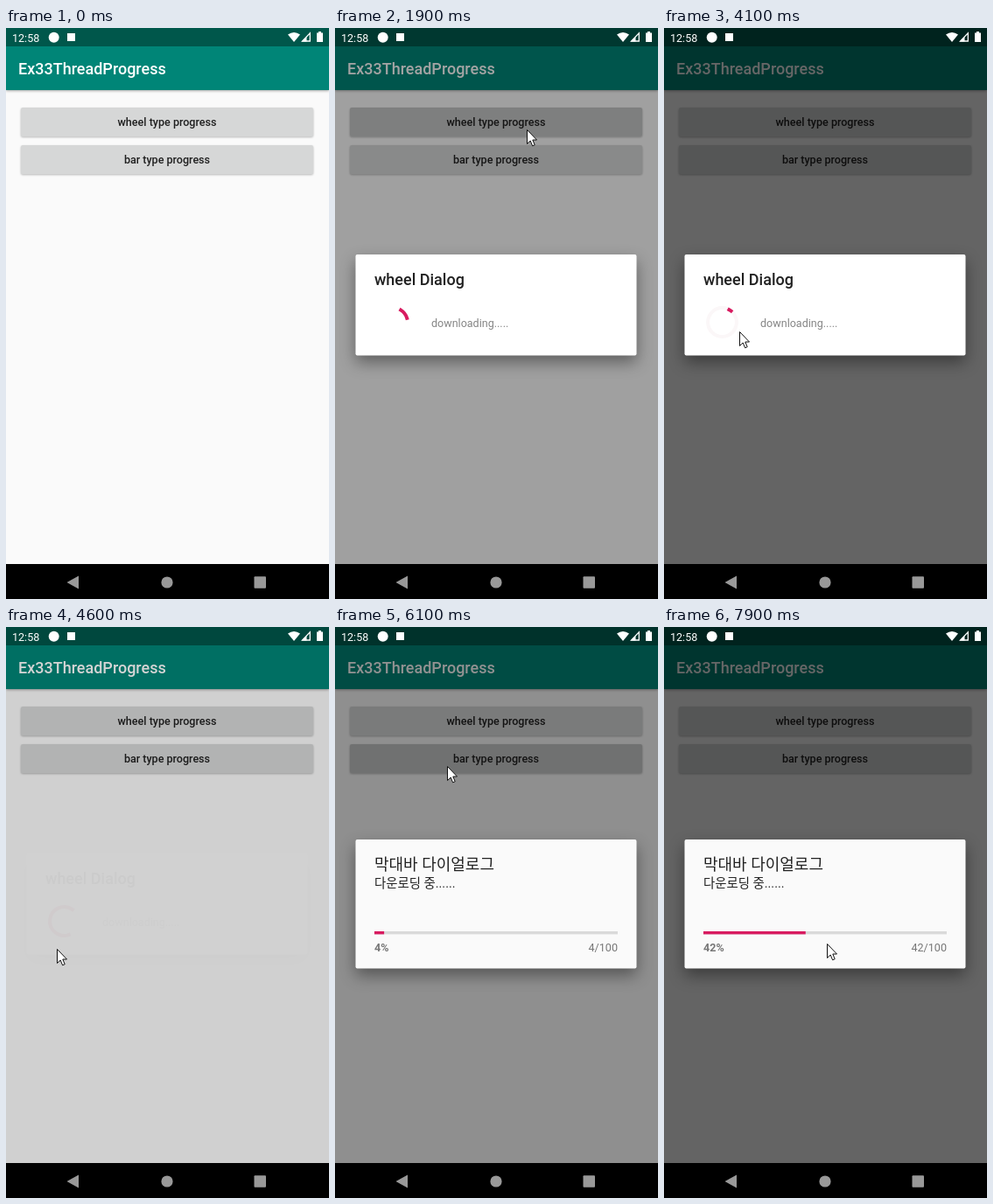
These frames come from a looping animation (369 px wide and 653 px high, 8000 ms). An HTML page:

```html
<!DOCTYPE html>
<html lang="ko">
<head>
<meta charset="utf-8">
<title>Progress dialogs</title>
<style>
  html, body { margin: 0; width: 100%; height: 100%; overflow: hidden; background: #000; }
  svg { display: block; font: 12.57px Roboto, "Noto Sans CJK KR", sans-serif; }
  .title { font-size: 18px; font-weight: 500; }
  .label { font-weight: 500; text-anchor: middle; fill: #202020; }
  .button { fill: #d6d7d7; filter: drop-shadow(0 1px 1px #0004); }
  .bar { fill: #008577; filter: drop-shadow(0 1px 1.5px #0005); }
  .panel { filter: drop-shadow(0 8px 9px #0006); }
  .dialog { transform-origin: 184px 317px; }
  .grey { fill: #777; }
</style>
</head>
<body>
<svg width="369" height="653" viewBox="0 0 369 653">
  <rect width="369" height="613" fill="#fafafa"/>
  <rect class="bar" y="21" width="369" height="50"/>
  <rect width="369" height="21" fill="#00574b"/>
  <text class="title" x="14" y="53" fill="#fff">Ex33ThreadProgress</text>

  <rect class="button" x="17" y="91" width="334" height="33" rx="2"/>
  <rect class="button" x="17" y="134" width="334" height="33" rx="2"/>
  <rect id="press" x="17" width="334" height="33" rx="2" opacity=".08"/>
  <text class="label" x="184" y="112">wheel type progress</text>
  <text class="label" x="184" y="155">bar type progress</text>

  <rect id="dim" width="369" height="613"/>

  <g fill="#fff">
    <text x="7" y="15.5">12:58</text>
    <circle cx="54.7" cy="10.7" r="6"/>
    <rect x="70" y="6" width="9" height="9"/>
    <path d="M329 16L322 7.5Q329 2.5 336 7.5Z"/>
    <path d="M338.5 15H347.3V5.8Z" fill="none" stroke="#fff" stroke-width="1.3"/>
    <path d="M338 15.5H343.5V10Z"/>
    <path d="M355 5.5H357V4H360V5.5H362V16H355Z"/>
  </g>

  <rect y="613" width="369" height="40"/>
  <g fill="#999">
    <path d="M69.5 634L83 626.5V641.5Z"/>
    <circle cx="184" cy="634" r="6.6"/>
    <rect x="283.5" y="627.3" width="13.5" height="13.5" rx="1"/>
  </g>

  <g id="wheel" class="dialog">
    <rect class="panel" x="23.5" y="259" width="321" height="115.5" rx="2" fill="#fff"/>
    <text class="title" x="45" y="294" fill="#212121">wheel Dialog</text>
    <text x="110" y="342" fill="#858585">downloading.....</text>
    <g fill="none" stroke-width="4">
      <circle id="track" cx="66.5" cy="336.5" r="16.4" stroke="#fbf7f8"/>
      <path id="arc" stroke="#d81b60" stroke-linecap="square"/>
    </g>
  </g>

  <g id="download" class="dialog">
    <rect class="panel" x="23.5" y="243" width="321" height="147.5" rx="2" fill="#fafafa"/>
    <text x="45" y="278" font-size="18" fill="#212121">막대바 다이얼로그</text>
    <text x="45" y="298" font-size="14.4" fill="#212121">다운로딩 중......</text>
    <rect x="45" y="348" width="278" height="3.4" fill="#dadada"/>
    <rect id="fill" x="45" y="348" height="3.4" fill="#d81b60"/>
    <text id="percent" class="grey" x="45" y="371" font-weight="700"></text>
    <text id="count" class="grey" x="323" y="371" text-anchor="end"></text>
  </g>

  <path id="cursor" d="M.5 .5V16.5L4.2 13L6.6 18.8L9.2 17.7L6.8 12H11.5Z"
        fill="#fff" stroke="#111" stroke-linejoin="round"/>
</svg>
<script>
const $ = id => document.getElementById(id);
const set = (id, attrs) => {
  for (const name in attrs) $(id).setAttribute(name, attrs[name]);
};
const clamp = v => Math.min(1, Math.max(0, v));
const ramp = (t, from, length) => clamp((t - from) / length);

const LOOP = 8000, FRAME = 100;
const WHEEL_IN = 1720, WHEEL_OUT = 4385, BAR_IN = 5885;

// Cursor tip: time, x, y
const route = [
  [200, 340, 191], [1000, 219, 118], [1100, 219, 117], [1700, 219, 116],
  [2500, 219, 116], [2900, 219, 142], [3400, 184, 301], [4300, 58, 360],
  [4400, 58, 368], [4800, 58, 368], [5300, 128, 164], [5400, 128, 163],
  [5600, 128, 159], [6200, 128, 159], [6700, 135, 189], [7600, 186, 362],
  [LOOP, 186, 362]
];

function cursorAt(t) {
  const i = Math.max(1, route.findIndex(p => p[0] > t));
  const [a, b] = [route[i - 1], route[i]];
  const k = ramp(t, a[0], b[0] - a[0]);
  return [1, 2].map(n => a[n] + (b[n] - a[n]) * k);
}

// Bezier (0,0) (.2,0) (.1,1) (.5,1), then flat at 1
function trim(x) {
  if (x <= 0) return 0;
  if (x >= .5) return 1;
  let low = 0, high = 1;
  for (let i = 0; i < 20; i++) {
    const s = (low + high) / 2, r = 1 - s;
    if (.6 * s * r * r + .3 * s * s * r + .5 * s ** 3 < x) low = s; else high = s;
  }
  return low * low * (3 - 2 * low);
}

function arcPath(t) {
  const cycles = Math.max(0, (t - 1770) * 1.08 / 1333), p = cycles % 1;
  const base = -90 + 90 * p + 216 * cycles;
  const from = base + 270 * trim(p - .5);
  const to = Math.max(from + .5, base + 270 * trim(p));
  const point = deg => {
    const a = deg * Math.PI / 180;
    return `${66.5 + 16.4 * Math.cos(a)} ${336.5 + 16.4 * Math.sin(a)}`;
  };
  return `M${point(from)}A16.4 16.4 0 ${+(to - from > 180)} 1 ${point(to)}`;
}

function showDialog(id, t, start, alpha = 1) {
  $(id).style.opacity = alpha * (1 - (1 - ramp(t, start, 190)) ** 3);
  $(id).style.transform = `scale(${1 - .1 * (1 - ramp(t, start, 220)) ** 5})`;
}

function draw(t) {
  const leaving = ramp(t, WHEEL_OUT, 300);
  const dim = ramp(t, WHEEL_IN, 300) - leaving + ramp(t, BAR_IN, 300);
  set('dim', { opacity: .6 * dim });

  const wheelPressed = t >= 1700 && t < 2200;
  const barPressed = t >= 5900 && t < 6200;
  set('press', {
    y: wheelPressed ? 91 : 134,
    visibility: wheelPressed || barPressed ? 'visible' : 'hidden'
  });

  showDialog('wheel', t, WHEEL_IN, (1 - leaving) ** 3);
  set('track', { opacity: ramp(t, 2000, 900) });
  set('arc', { d: arcPath(t) });

  showDialog('download', t, BAR_IN);
  const done = Math.max(0, Math.floor((t - 5910) / 47));
  set('fill', { width: 2.78 * done });
  $('percent').textContent = done + '%';
  $('count').textContent = done + '/100';

  set('cursor', {
    transform: `translate(${cursorAt(t).map(Math.round)})`,
    visibility: t < 200 ? 'hidden' : 'visible'
  });
}

const start = performance.now();
function tick() {
  const t = (performance.now() - start) % LOOP;
  draw(Math.floor(t / FRAME) * FRAME);
  requestAnimationFrame(tick);
}
tick();
</script>
</body>
</html>
```
